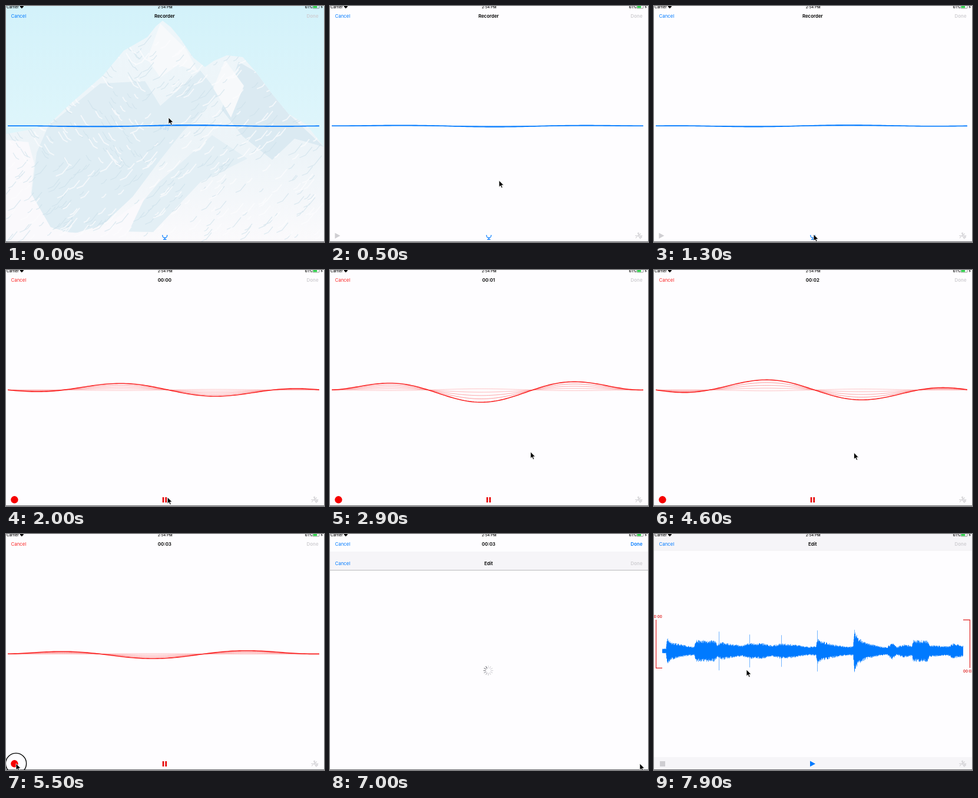
These frames come from a looping animation (540x402 px, 8 s). An HTML page:

```html
<!DOCTYPE html>
<html lang="en">
<head>
<meta charset="utf-8">
<title>Audio recorder</title>
<style>
  html, body { margin: 0; width: 100%; height: 100%; overflow: hidden; background: #fefdff; }
  svg { display: block; width: 540px; height: 402px; }
  text { font: 400 7.9px Inter, "Liberation Sans", sans-serif; }
  .bold { font-weight: 600; }
  .mid { text-anchor: middle; }
  .end { text-anchor: end; }
  .status text { font-size: 6.2px; font-weight: 500; }
  .label { font-size: 6px; font-weight: 600; fill: #e02020; }
  .blue { fill: #007aff; }
  .gray { fill: #cfced2; }
</style>
</head>
<body>
<svg viewBox="0 0 540 402">
  <defs>
    <linearGradient id="sky" x2="0" y2="1">
      <stop offset="0" stop-color="#d3f2fa"/>
      <stop offset=".6" stop-color="#e0f6fb"/>
    </linearGradient>
    <linearGradient id="snow" x2="0" y2="1">
      <stop offset="0" stop-color="#eef6fa"/>
      <stop offset=".6" stop-color="#edf4f8"/>
      <stop offset="1" stop-color="#fbfafc"/>
    </linearGradient>
    <clipPath id="ridge">
      <path id="peak" d="M0 218 38 211 70 204 110 166 165 118 200 76 240 53 255 34 266 25 280 36 295 54 318 88 338 104 352 94 375 84 402 87 424 112 452 150 480 184 510 202 540 240V402H0Z"/>
    </clipPath>
    <g id="mic" fill="none" stroke-width="1.2">
      <rect x="267.6" y="385.5" width="4.2" height="7.6" rx="2.1" stroke="none"/>
      <path d="M265.8 390v1a3.9 3.9 0 0 0 7.8 0v-1M269.7 395v2.6M267 397.6h5.4"/>
    </g>
    <g id="crop" fill="none" stroke-width="1.1">
      <path d="M518 391.3h12.5M524 385.5v6.5l3.2 4.8M522 392l-3 3.5M525 390l2.5-2.5M522.4 386.5l1.6 3"/>
      <circle cx="528" cy="393.6" r="1.3"/>
    </g>
  </defs>

  <rect width="540" height="402" fill="#fefdff"/>
  <g id="photo">
    <rect width="540" height="402" fill="url(#sky)"/>
    <use href="#peak" fill="url(#snow)"/>
    <g clip-path="url(#ridge)">
      <path fill="#dfedf4" d="M72 204 160 132 236 128 262 170 330 110 362 150 300 214 262 262 215 325 165 372 115 388 66 374 42 330 52 250Z"/>
      <path fill="#dbeaf2" d="M395 95 424 112 480 184 540 240 490 226 452 262 402 222 366 176Z"/>
      <path fill="#e3eff5" d="M350 220 410 260 330 300 250 385 190 384 260 300Z"/>
      <path fill="#faf9fc" d="M0 228 38 232 48 268 42 318 80 384 150 388 236 326 200 402H0Z"/>
      <path fill="#f7f9fb" d="M262 30 240 90 262 122 292 100 326 112 306 74ZM372 92 352 140 382 190 404 136Z"/>
      <path id="rocks" fill="none" stroke="#cbdfe9" stroke-width="1.3" stroke-opacity=".6"/>
      <path id="streaks" fill="none" stroke="#fcfdfe" stroke-width="1.8" stroke-opacity=".75"/>
    </g>
    <text class="mid" x="269.5" y="211" fill="#b3d8f5">Play</text>
  </g>

  <g id="wave" fill="none"></g>
  <g id="nav">
    <text id="cancel" x="8.5" y="19.6">Cancel</text>
    <text id="title" class="bold mid" x="269.3" y="19.6"></text>
    <text id="done" class="bold end" x="530.6" y="19.6">Done</text>
  </g>
  <path id="play" d="M8.4 386.4 17.4 391.3 8.4 396.2Z"/>
  <circle id="dot" cx="14.4" cy="391.3" r="6.2" fill="#f60000"/>
  <use id="micBtn" href="#mic" fill="#007aff" stroke="#007aff"/>
  <path id="pause" fill="#e60000" d="M265.7 387h2.6v9h-2.6zM270.4 387h2.6v9h-2.6z"/>
  <use id="cropBtn" href="#crop"/>

  <g id="edit">
    <rect y="-5" width="540" height="420" fill="#fefdff"/>
    <rect y="-4" width="540" height="32" fill="#f6f5f8"/>
    <rect id="hair" y="27.6" width="540" height=".8" fill="#a5a5a8"/>
    <text class="blue" x="8.5" y="19.6">Cancel</text>
    <text class="bold mid" x="269.3" y="19.6">Edit</text>
    <text class="end gray bold" x="530.6" y="19.6">Done</text>
    <g id="spinner" stroke="#606068" stroke-width="1.1" stroke-linecap="round"></g>
    <g id="clip">
      <path id="sound" class="blue"/>
      <path d="M3.5 146V228.3H14M525 146.3H536.5V228.3" fill="none" stroke="#e02020" stroke-width="1.2"/>
      <text class="label end" x="13.6" y="143.3">00:00</text>
      <text class="label" x="525" y="235.8">00:03</text>
    </g>
    <rect y="380" width="540" height="24" fill="#f6f5f8"/>
    <rect class="gray" x="10" y="387" width="9" height="9"/>
    <path class="blue" d="M265 386.6 274 391.4 265 396.2Z"/>
    <use href="#crop" stroke="#cfced2"/>
  </g>

  <g class="status">
    <text x="1" y="3.7">Carrier</text>
    <path d="M23.4 .7Q26.8-1.8 30.2.7L26.8 4.2Z"/>
    <text class="mid" x="270.2" y="3.7">2:54 PM</text>
    <text x="507.7" y="3.7">61%</text>
    <rect x="520.8" y="-.8" width="11.2" height="4.8" rx="1" fill="none" stroke="#555" stroke-width=".6"/>
    <rect x="521.6" y="-.2" width="6.6" height="3.6" fill="#35d451"/>
    <path d="M536.8-1 534.6 2h1.6l-.6 2.4 2.2-3h-1.6z"/>
  </g>
  <rect y="401" width="540" height="1" fill="#66666a"/>
  <circle id="ring" fill="none" stroke="#000" stroke-width="1.4"/>
  <path id="cursor" d="M0 0V11.2L2.6 8.8 4.3 12.9 6.2 12.1 4.5 8.1H8Z" stroke="#fff" stroke-width=".8"/>
</svg>

<script>
const LOOP = 8000, REC_START = 1650, REC_END = 5600, SLIDE = 6720, LOADED = 7500;
const BLUE = '#007aff', RED = '#fa2626', GRAY = '#cfced2';
const el = id => document.getElementById(id);
const clamp = v => Math.max(0, Math.min(1, v));
const show = (id, on) => el(id).style.display = on ? '' : 'none';

function add(parent, tag, attrs) {
  const node = document.createElementNS('http://www.w3.org/2000/svg', tag);
  for (const k in attrs) node.setAttribute(k, attrs[k]);
  return el(parent).appendChild(node);
}

function random(seed) {
  return () => (seed = seed * 16807 % 2147483647) / 2147483647;
}

// Linear value between [position, value] keys
function lerp(keys, p) {
  const i = keys.findIndex(k => k[0] > p);
  if (i === 0) return keys[0][1];
  if (i < 0) return keys[keys.length - 1][1];
  const [p0, v0] = keys[i - 1], [p1, v1] = keys[i];
  return v0 + (v1 - v0) * (p - p0) / (p1 - p0);
}

const phase = [[0, -.84], [500, -3.33], [2000, -11.1], [3800, -19.81], [5500, -27.88], [8000, -40.1]];
const voice = [[1650, 1.6], [1750, 16], [2000, 12], [2200, 32], [2400, 24], [2600, 18], [2900, 21],
  [3200, 16], [3540, 10], [3700, 32], [3800, 30], [4030, 11], [4150, 36], [4450, 15], [4600, 19],
  [4750, 13], [4930, 34], [5120, 14], [5350, 16], [5500, 8], [5600, 6], [5700, 1.6]];
const mouse = [[0, 276, 190], [150, 277, 196], [500, 287, 297], [1100, 271, 389], [1650, 271, 389],
  [2000, 274, 387], [2300, 290, 360], [2800, 340, 310], [3800, 345, 308], [4600, 340, 311],
  [5300, 17, 391], [5700, 17, 391], [6400, 526, 391], [7200, 526, 391], [7800, 157, 231]];
const mouseX = mouse.map(([t, x]) => [t, x]), mouseY = mouse.map(([t, , y]) => [t, y]);
const clicks = [1500, 5400, 6480];
const loudness = [[14, 4], [20, 4], [22, 22], [28, 15], [45, 11], [60, 8], [68, 7], [71, 18], [103, 18],
  [107, 11], [115, 15], [130, 12], [150, 9], [160, 13], [185, 13], [200, 9], [215, 13], [240, 11],
  [262, 7], [275, 8], [277, 22], [283, 17], [305, 11], [330, 7], [338, 8], [340, 34], [346, 22],
  [360, 14], [378, 9], [395, 6], [404, 14], [412, 7], [425, 11], [438, 9], [440, 18], [464, 18],
  [468, 10], [500, 8], [508, 13], [525, 9]];

function drawSound() {
  const rnd = random(71);
  const spikes = { 110: 33, 162: 28, 216: 27, 277: 35, 340: 36 };
  let d = '';
  for (let x = 14; x < 525; x += .5) {
    const size = lerp(loudness, x);
    const top = spikes[x] || size * (.72 + .33 * rnd());
    const bottom = spikes[x] || size * (.72 + .33 * rnd());
    d += `M${x} ${(199.3 - top).toFixed(1)}h.55v${(top + bottom).toFixed(1)}h-.55z`;
  }
  el('sound').setAttribute('d', d);
}

function drawRocks(id, seed, count) {
  const rnd = random(seed);
  let d = '';
  for (let i = 0; i < count; i++) {
    const x = rnd() * 540, y = 40 + rnd() * 350, n = 4 + rnd() * 12;
    const lean = x < 230 && y < 260 ? .6 : -.8;
    d += `M${x | 0} ${y | 0}l${(n * lean).toFixed(1)} ${n.toFixed(1)} ${(n * lean * .9).toFixed(1)} ${(n * .3).toFixed(1)}`;
  }
  el(id).setAttribute('d', d);
}

drawSound();
drawRocks('rocks', 29, 330);
drawRocks('streaks', 83, 260);

const lines = [4, 3, 2, 1, 0].map(i => {
  const progress = 1 - i / 5;
  const node = add('wave', 'path', {
    'stroke-width': i ? .55 : 1.6,
    'stroke-opacity': Math.min(1, progress * 2 / 3 + 1 / 3)
  });
  return { node, gain: (1.5 * progress - .4) / 1.1 };
});
const spokes = Array.from({ length: 12 }, (_, i) =>
  add('spinner', 'path', { d: 'M0-4.4V-8', transform: `translate(268.8 198.8) rotate(${i * 30})` }));

function drawWave(t, color) {
  const amp = lerp(voice, t), ph = lerp(phase, t);
  el('wave').setAttribute('stroke', color);
  for (const { node, gain } of lines) {
    let d = '';
    for (let x = 0; x <= 533; x += 4.1) {
      const fade = 1 - (x / 266.5 - 1) ** 2;
      const y = 204.3 + fade * amp * gain * Math.sin(3 * Math.PI * x / 533 + ph);
      d += `${d ? 'L' : 'M'}${(x + 3).toFixed(1)} ${y.toFixed(2)}`;
    }
    node.setAttribute('d', d);
  }
}

function drawRecorder(t) {
  const recording = t >= REC_START && t < REC_END, finished = t >= REC_END;
  const tint = recording ? RED : BLUE, tool = finished ? BLUE : GRAY;
  const appear = clamp(t / 250);
  el('photo').style.opacity = 1 - appear;
  drawWave(t, tint);
  el('cancel').setAttribute('fill', tint);
  el('done').setAttribute('fill', tool);
  const seconds = Math.floor((Math.min(t, REC_END - 1) - REC_START) / 1000);
  el('title').textContent = t < REC_START ? 'Recorder' : '00:0' + seconds;
  el('play').setAttribute('fill', tool);
  el('cropBtn').setAttribute('stroke', tool);
  el('play').style.opacity = el('cropBtn').style.opacity = appear;
  show('play', !recording);
  show('micBtn', !recording);
  show('dot', recording);
  show('pause', recording);
}

function drawEdit(t) {
  const left = (1 - clamp((t - SLIDE) / 500)) ** 3;
  show('edit', t >= SLIDE);
  el('edit').setAttribute('transform', `translate(0 ${(402 * left).toFixed(2)})`);
  el('hair').style.opacity = left > 0 ? 1 : .15;
  show('spinner', t < LOADED);
  show('clip', t >= LOADED);
  const head = Math.floor((t - 7000) / 83.3) + 47;
  spokes.forEach((s, i) => s.setAttribute('stroke-opacity', Math.max(.25, 1 - ((head - i) % 12) * .13)));
}

function drawMouse(t) {
  const x = lerp(mouseX, t), y = lerp(mouseY, t);
  el('cursor').setAttribute('transform', `translate(${x.toFixed(1)} ${y.toFixed(1)})`);
  const start = clicks.find(c => t >= c && t < c + 200);
  show('ring', start !== undefined);
  if (start === undefined) return;
  el('ring').setAttribute('cx', x);
  el('ring').setAttribute('cy', y);
  el('ring').setAttribute('r', 10 + 7.6 * clamp((t - start) / 100));
}

const begin = performance.now();
function frame(now) {
  const t = Math.max(0, now - begin) % LOOP;
  drawRecorder(t);
  drawEdit(t);
  drawMouse(t);
  requestAnimationFrame(frame);
}
frame(begin);
</script>
</body>
</html>
```
